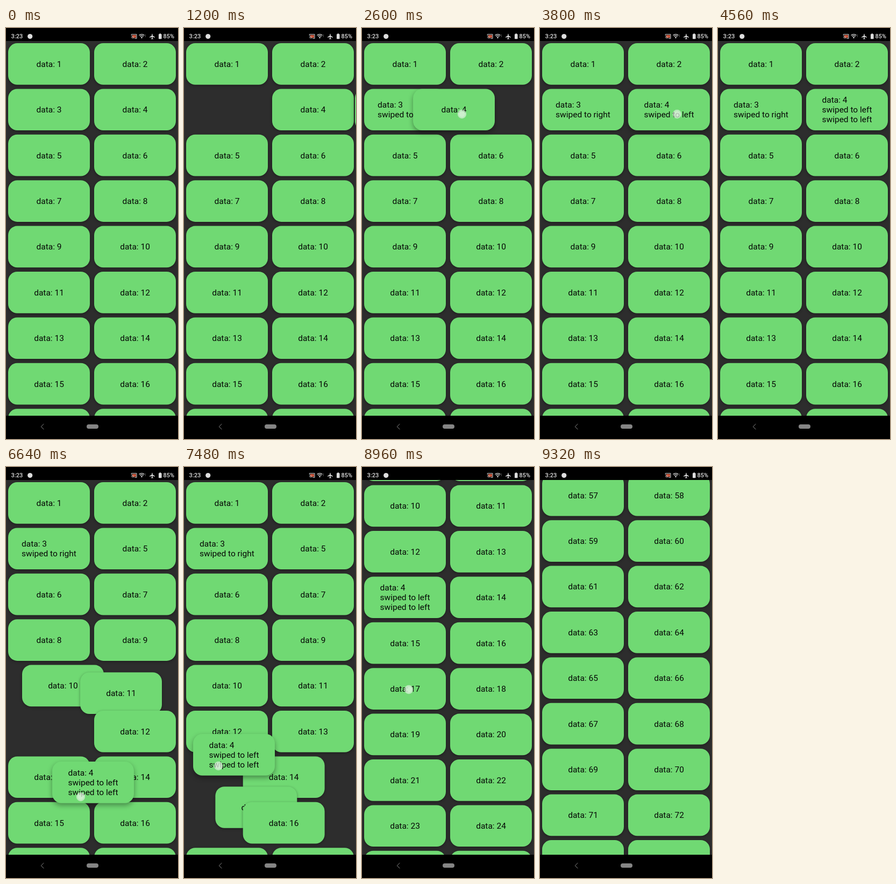
An HTML page with a canvas that plays this animation: 320 px wide and 759 px high, repeating every 9360 ms.

```html
<!DOCTYPE html>
<html lang="en">
<head>
<meta charset="utf-8">
<title>Swipe and drag grid</title>
<style>
  html, body { margin: 0; height: 100%; overflow: hidden; background: #000; }
  canvas { display: block; }
</style>
</head>
<body>
<canvas id="stage" width="320" height="759"></canvas>
<script>
const ctx = document.getElementById('stage').getContext('2d');
const LOOP = 9360, STEP = 40, ANIM = 250;
const CARD_W = 152, CARD_H = 76.7, ROW = 84.4, LINE = 18.15;
const GREEN = '#70d973', LIGHT = '#dedede';

// Swipes: card, touch down, drag start, release, direction, speed (px/ms), touch x
const swipes = [
  { card: 3, down: 600, start: 680, up: 980, dir: 1, speed: 0.5, x: 60 },
  { card: 4, down: 2200, start: 2480, up: 2780, dir: -1, speed: 0.575, x: 255 },
  { card: 4, down: 3800, start: 3800, up: 4030, dir: -1, speed: 0.575, x: 255 },
];

// Long-press drag of card 4: time, x, y
const HELD = 4, PRESS = 5120, PICK = 5600, DROP = 7940;
const dragPath = [
  [PICK, 164, 112.4], [5880, 158, 198], [6080, 143, 283], [6280, 119, 368],
  [6456, 101, 452], [6640, 86, 544], [6850, 116, 604], [7020, 140, 626],
  [7180, 108, 598], [7329, 52, 532], [7480, 17, 493], [7700, 8, 508], [DROP, 6, 520],
];
// Time, new slot of the held card
const moves = [[5880, 5], [6080, 7], [6280, 8], [6456, 10], [6640, 12], [7000, 15], [7329, 12]];

const clamp = v => Math.min(1, Math.max(0, v));
const lerp = (a, b, p) => a + (b - a) * p;
const ease = p => (1 - Math.cos(Math.PI * clamp(p))) / 2;
const mix = (a, b, p) => ({ x: lerp(a.x, b.x, p), y: lerp(a.y, b.y, p) });
const slotPos = i => ({ x: i % 2 ? 164 : 4, y: 28 + Math.floor(i / 2) * ROW });

// Hermite curve through the keys
function along(keys, t) {
  const last = keys.length - 1;
  if (t >= keys[last][0]) return { x: keys[last][1], y: keys[last][2] };
  const i = Math.max(0, keys.findIndex(k => k[0] > t) - 1);
  const span = keys[i + 1][0] - keys[i][0], p = clamp((t - keys[i][0]) / span);
  const slope = (j, d) => {
    const a = keys[Math.max(0, j - 1)], b = keys[Math.min(last, j + 1)];
    return (b[d] - a[d]) / (b[0] - a[0]) * span;
  };
  const value = d => {
    const a = keys[i][d], b = keys[i + 1][d], q = 1 - p;
    return a * (1 + 2 * p) * q * q + slope(i, d) * p * q * q
      + b * p * p * (3 - 2 * p) - slope(i + 1, d) * p * p * q;
  };
  return { x: value(1), y: value(2) };
}

function scrollAt(t) {
  if (t < 8960) return 332 * clamp((t - 8860) / 100) ** 1.5;
  const s = t - 8960;
  return 332 + 6.2 * s - 0.00144 * s * s;
}

// Card slides out, then its updated copy slides back while fading in
function swipeState(s, t) {
  const drag = s.dir * s.speed * (Math.min(t, s.up) - s.start), back = s.up + ANIM + 30;
  if (t < s.start || t >= back + ANIM) return null;
  if (t < s.up) return { dx: drag, alpha: 1, lifted: true };
  if (t < back) return { dx: lerp(drag, s.dir * 320, ease((t - s.up) / ANIM)), alpha: 1, lifted: true };
  const p = ease((t - back) / ANIM);
  return { dx: s.dir * 320 * (1 - p), alpha: p, lifted: false };
}

function layout(t) {
  const order = Array.from({ length: 100 }, (_, i) => i + 1);
  const pos = order.map((_, i) => slotPos(i));
  for (const [start, to] of moves) {
    if (t < start) break;
    const before = order.slice();
    order.splice(order.indexOf(HELD), 1);
    order.splice(to, 0, HELD);
    order.forEach((n, i) => {
      if (before[i] !== n) pos[n - 1] = mix(pos[n - 1], slotPos(i), ease((t - start) / ANIM));
    });
  }
  if (t >= PICK) {
    const settled = slotPos(moves[moves.length - 1][1]);
    pos[HELD - 1] = mix(along(dragPath, t), settled, ease((t - DROP) / ANIM));
  }
  const scroll = scrollAt(t);
  return order.map(n => {
    const { x, y } = pos[n - 1];
    const card = { x, y: y - scroll, lines: ['data: ' + n], alpha: 1,
      lifted: n === HELD && t >= PICK && t < DROP + ANIM };
    for (const s of swipes.filter(s => s.card === n)) {
      if (t >= s.up + ANIM + 30) card.lines.push('swiped to ' + (s.dir > 0 ? 'right' : 'left'));
      const state = swipeState(s, t);
      if (state) {
        card.x += state.dx;
        card.alpha = state.alpha;
        card.lifted = state.lifted;
      }
    }
    return card;
  });
}

function roundRect(x, y, w, h, r, fill) {
  ctx.fillStyle = fill;
  ctx.beginPath();
  ctx.roundRect(x, y, w, h, r);
  ctx.fill();
}

function disc(x, y, r, fill) {
  ctx.fillStyle = fill;
  ctx.beginPath();
  ctx.arc(x, y, r, 0, 7);
  ctx.fill();
}

function stroke(path, color, width = 1) {
  ctx.strokeStyle = color;
  ctx.lineWidth = width;
  ctx.stroke(new Path2D(path));
}

function drawCard({ x, y, lines, alpha, lifted }) {
  if (y > 720 || y < -80) return;
  ctx.save();
  ctx.globalAlpha = alpha;
  ctx.shadowColor = 'rgba(0,0,0,.36)';
  ctx.shadowBlur = lifted ? 10 : 5;
  ctx.shadowOffsetY = lifted ? 4 : 1.5;
  roundRect(x, y, CARD_W, CARD_H, 17, GREEN);
  ctx.shadowColor = 'transparent';
  ctx.fillStyle = '#050805';
  ctx.font = '15.5px Roboto, sans-serif';
  const width = Math.max(...lines.map(l => ctx.measureText(l).width));
  const top = y + CARD_H / 2 - lines.length * LINE / 2 + 14.6;
  lines.forEach((l, i) => ctx.fillText(l, x + (CARD_W - width) / 2, top + i * LINE));
  ctx.restore();
}

function touchAt(t) {
  const s = swipes.find(s => t >= s.down && t < s.up);
  if (s) return { x: s.x + s.dir * s.speed * Math.max(0, t - s.start), y: 159 };
  if (t >= PRESS && t < DROP) {
    const p = along(dragPath, t), shift = 6 * clamp((t - 6640) / 840);
    return { x: p.x + 53 - shift, y: p.y + 65 - shift };
  }
  if (t >= 8860 && t < 8990) return { x: 87, y: 640 - 229 * clamp((t - 8860) / 100) ** 1.5 };
}

function drawBars() {
  ctx.fillStyle = '#000';
  ctx.fillRect(0, 0, 320, 24);
  ctx.fillRect(0, 716, 320, 43);

  ctx.fillStyle = LIGHT;
  ctx.font = '500 11px Roboto, sans-serif';
  ctx.fillText('3:23', 9.5, 19.3);
  ctx.fillText('85%', 292.5, 19.3);
  disc(44.7, 15.5, 4.6, LIGHT);

  // Cast
  roundRect(235, 13, 7, 5, 0, '#c8553c');
  stroke('M233.3 13.5V11.7H243V19.3H239.5', LIGHT);
  stroke('M233 14.8A4.8 4.8 0 0 1 237.8 19.6M233 17.2A2.4 2.4 0 0 1 235.4 19.6', LIGHT, 0.9);
  // Wi-Fi
  stroke('M247.5 13.6Q252.5 9.6 257.5 13.6M249.2 15.6Q252.5 13 255.8 15.6', LIGHT, 1.3);
  ctx.fillStyle = LIGHT;
  ctx.fill(new Path2D('M250.6 17.1Q252.5 15.8 254.4 17.1L252.5 19.6Z'));
  ctx.fillStyle = '#888';
  ctx.fillRect(259, 12.5, 1, 1.5);
  ctx.fillRect(259, 15.2, 1, 1.2);
  // Airplane
  ctx.fillStyle = LIGHT;
  ctx.fill(new Path2D('M271.3 11.5Q272 10 272.7 11.5V14L277 16.7V17.8L272.7 16.5V19L274 20V20.8L272 20.2L270 20.8V20L271.3 19V16.5L267 17.8V16.7L271.3 14Z'));
  // Battery
  roundRect(285.5, 10.3, 2.6, 2, 0, LIGHT);
  roundRect(284, 11.3, 5.6, 9, 0.7, LIGHT);

  stroke('M70.3 731.2L65.2 736.2L70.3 741.2', '#8a8a8a');
  roundRect(150, 732, 22, 8, 4, '#858585');
}

function draw(now) {
  const t = Math.floor(now % LOOP / STEP) * STEP;
  ctx.fillStyle = '#2d2d2d';
  ctx.fillRect(0, 0, 320, 759);
  const cards = layout(t);
  cards.filter(c => !c.lifted).forEach(drawCard);
  cards.filter(c => c.lifted).forEach(drawCard);
  const touch = touchAt(t);
  if (touch) {
    disc(touch.x, touch.y, 8.2, 'rgba(235,245,235,.6)');
    disc(touch.x, touch.y, 5.5, 'rgba(240,245,240,.35)');
  }
  drawBars();
  requestAnimationFrame(draw);
}
requestAnimationFrame(draw);
</script>
</body>
</html>
```
